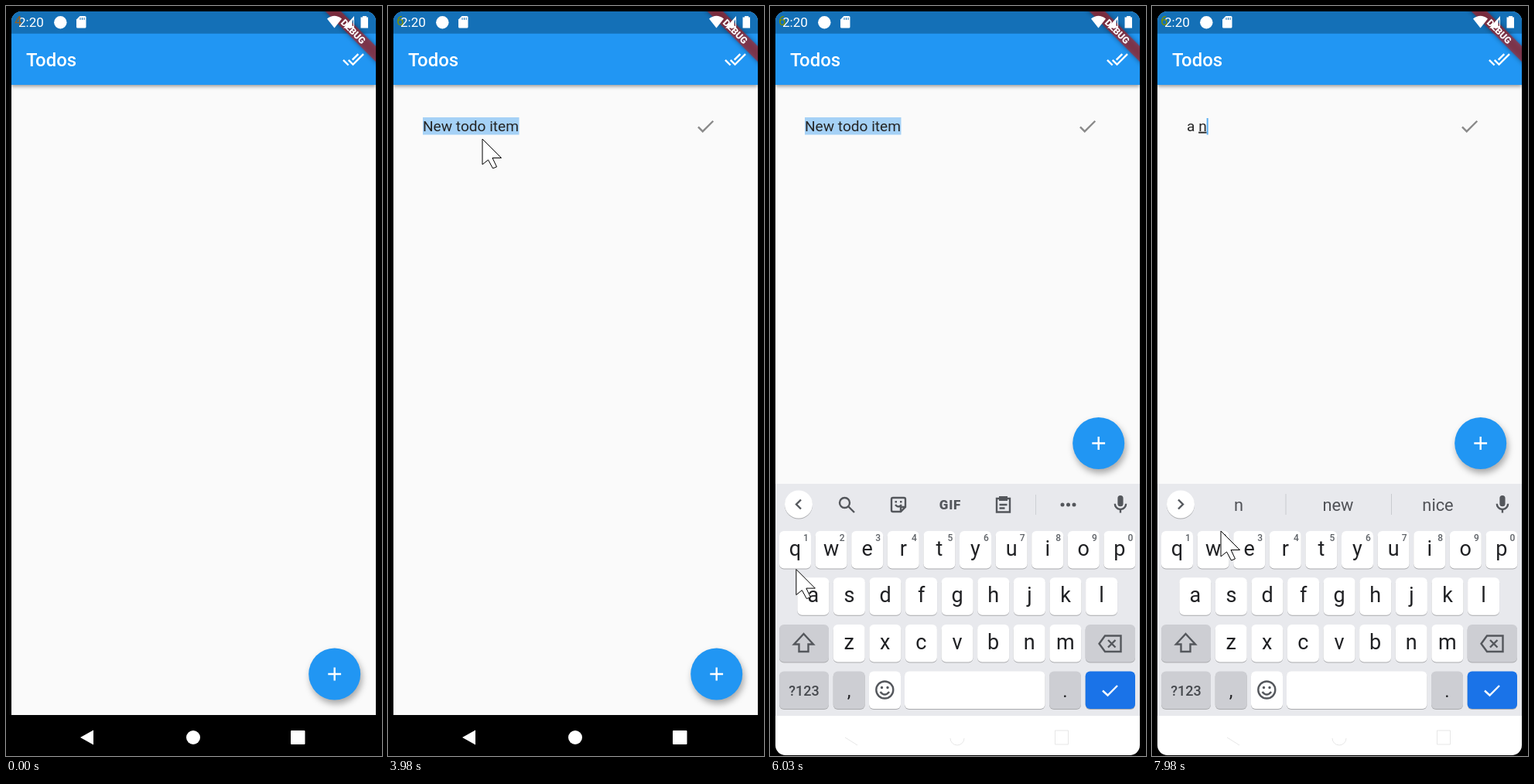
Animation of 486 by 970 pixels, one loop 8 s. Source, as an HTML page:

```html
<!DOCTYPE html>
<html lang="en">
<head>
<meta charset="utf-8">
<title>Todos</title>
<style>
  html, body { margin: 0; width: 100%; height: 100%; overflow: hidden; background: #000; }
  svg { display: block; width: 486px; height: 970px; font-family: Roboto, sans-serif; }
  text { white-space: pre; }
  .mid { text-anchor: middle; }
  .line { fill: none; stroke: #54575c; stroke-width: 2.4; }
  .key { filter: drop-shadow(0 1px .6px #0004); }
  #composing { text-decoration: underline; }
</style>
</head>
<body>
<svg viewBox="0 0 486 970">
  <defs>
    <clipPath id="screen"><rect x="7" y="7" width="471" height="962" rx="13"/></clipPath>
    <clipPath id="aboveNav"><rect x="7" y="102" width="471" height="816"/></clipPath>
  </defs>
  <rect width="486" height="970"/>
  <g clip-path="url(#screen)">
    <rect x="7" y="7" width="471" height="910" fill="#fafafa"/>
    <rect x="7" y="7" width="471" height="95" fill="#2196f3" style="filter:drop-shadow(0 2px 2.5px #0006)"/>
    <rect x="7" y="7" width="471" height="28.7" fill="#1470b7"/>
    <text x="26" y="78" font-size="23.9" font-weight="500" fill="#fff">Todos</text>
    <path transform="translate(434.6 54.6) scale(1.196)" fill="#fff" d="M18 7l-1.41-1.41-6.34 6.34 1.41 1.41zm4.24-1.41L11.66 16.17 7.48 12l-1.41 1.41L11.66 19l12-12zM.41 13.41L6 19l1.41-1.41L1.83 12z"/>
    <g transform="translate(449 33) rotate(45)">
      <rect x="-70" y="-7.2" width="140" height="14.4" fill="#b71c1c" fill-opacity=".63" style="filter:drop-shadow(0 0 3px #0009)"/>
      <text class="mid" y="4.4" font-size="12.2" font-weight="900" fill="#fff">DEBUG</text>
    </g>

    <g fill="#fff">
      <text x="16" y="27.3" font-size="17">2:20</text>
      <circle cx="70.3" cy="21.2" r="8.2"/>
      <path d="M95.500 13H102q1.500 0 1.500 1.500V27q0 1.500-1.500 1.500H92.500q-1.500 0-1.500-1.500V17.500z"/>
      <path d="M415 16.500Q424.500 9 434 16.500L424.500 28.500z"/>
      <path d="M450 13V28.500H436zM447.500 20V26H449V17z" fill-rule="evenodd"/>
      <path d="M461 13h5v1.500h2V28.500h-9.500V14.500h2.500z"/>
    </g>
    <path d="M96 15v3M98.500 15v3M101 15v3" stroke="#1470b7"/>
    <text id="counter" x="11" y="25" font-size="17"/>

    <g id="item">
      <rect id="selection" x="45" y="144" width="124.500" height="22.500" fill="#a5d1f6"/>
      <text id="label" x="45" y="161.7" font-size="19.1" fill="#252525"><tspan id="settled"></tspan><tspan id="composing"></tspan></text>
      <rect id="caret" y="145" width="2" height="21.500" fill="#5aaef2"/>
      <path transform="translate(396 141.2) scale(1.196)" fill="#8a8a8a" d="M9 16.170L4.830 12l-1.420 1.410L9 19 21 7l-1.410-1.410z"/>
    </g>

    <g id="fab">
      <circle cx="424.700" cy="864" r="33.500" fill="#2196f3" style="filter:drop-shadow(2px 5px 4px #0005)"/>
      <path d="M416.300 864h16.800M424.700 855.600v16.800" stroke="#fff" stroke-width="2.400"/>
    </g>

    <g fill="#fff">
      <rect x="7" y="917" width="471" height="53" fill="#000"/>
      <path d="M96 946l17-9.500v19z"/>
      <circle cx="242" cy="946" r="9"/>
      <rect x="368" y="937" width="18.500" height="18" rx="1"/>
    </g>
    <g id="lightNav">
      <path d="M7 917.500H478V970H7z" fill="#fff"/>
      <path d="M7 917.500H478" stroke="#d9dadc"/>
      <path d="M97 946l16 10M233 947a9 9 0 0 0 18 0M368.500 937h17v18h-17z" fill="none" stroke="#e6e6e6"/>
    </g>

    <g clip-path="url(#aboveNav)"><g id="keyboard">
      <rect x="7" y="618" width="471" height="300" fill="#e8e9ed"/>
      <circle class="key" cx="37" cy="644.500" r="18" fill="#fff"/>
      <path id="chevron" class="line"/>
      <path transform="translate(438.600 630.500) scale(1.196)" fill="#54575c" d="M12 14a3 3 0 0 0 3-3V5a3 3 0 0 0-6 0v6a3 3 0 0 0 3 3zm5-3a5 5 0 0 1-10 0H5a7 7 0 0 0 6 6.920V21h2v-3.080A7 7 0 0 0 19 11z"/>
      <g id="tools">
        <circle class="line" cx="96.500" cy="642.500" r="6.500"/>
        <path class="line" d="M101 647l8 8M159 636q-2 0-2 2v14q0 2 2 2h10l6-6v-10q0-2-2-2zM169 654v-6h6M162 645q4 5 8 0M293 637v17.500h17V637zM296.500 645h10M296.500 649.500h7" stroke-width="2"/>
        <path d="M161.500 640h2.500v2.500h-2.500zM168 640h2.500v2.500H168zM296 634h11v6h-11z" fill="#54575c"/>
        <text class="mid" x="233" y="650.500" font-size="17" font-weight="900" fill="#54575c" letter-spacing=".8">GIF</text>
        <path d="M343.500 632v26" stroke="#ced0d4"/>
        <path d="M378 645h.01M385.500 645h.01M393 645h.01" stroke="#54575c" stroke-width="5" stroke-linecap="round"/>
      </g>
      <g id="suggestions" class="mid" font-size="21.800" fill="#505257">
        <path d="M173 631v27M309.500 631v27" stroke="#c9cbcf"/>
        <text x="112" y="653"/><text x="240.500" y="653"/><text x="369.500" y="653"/>
      </g>
      <g id="keys"></g>
      <path class="line" d="M43.500 812L31 825.500h6.500V835h12v-9.500H56z"/>
      <path class="line" d="M433 814.500h20.500v20.500H433l-7.500-10.250zM437 820l9.500 9.500M446.500 820l-9.500 9.500"/>
      <circle class="line" cx="148.300" cy="884.500" r="11"/>
      <path class="line" d="M142.500 887q5.800 7 11.600 0" stroke-width="2"/>
      <path d="M144.500 881.500h.01M152 881.500h.01" stroke="#54575c" stroke-width="3.400" stroke-linecap="round"/>
      <path d="M430 885.500l6.500 6 12.500-12.500" fill="none" stroke="#fff" stroke-width="2.400"/>
    </g></g>
  </g>
  <path id="pointer" d="M0 0V33L7.500 27 13.500 38 18.500 36 13 24.500H24.500z" fill="#fff" stroke="#000"/>
  <circle id="press" r="24" fill="#fffa00" fill-opacity=".5"/>
</svg>
<script>
const LOOP = 8000;
const $ = id => document.getElementById(id);
const show = (id, on) => { $(id).style.display = on ? '' : 'none'; };
const clamp = v => Math.min(1, Math.max(0, v));

// Keyboard
const PITCH = 46.6;
const key = (x, y, width, fill) =>
  `<rect class="key" x="${x}" y="${y}" width="${width}" height="48.500" rx="6" fill="${fill}"/>`;
const caption = (x, y, size, text, fill = '#202124', weight = 400) =>
  `<text class="mid" x="${x}" y="${y}" font-size="${size}" fill="${fill}" font-weight="${weight}">${text}</text>`;
const letters = (row, left, top) => [...row].map((letter, i) => {
  const x = left + i * PITCH;
  return key(x, top, 41, '#fff') + caption(x + 20.5, top + 31.7, 27, letter);
}).join('');
const digits = [...'1234567890'].map((digit, i) =>
  caption(46.5 + i * PITCH, 692, 12, digit, '#5f6368', 500)).join('');
const GREY = '#cdced3';
$('keys').innerHTML =
  letters('qwertyuiop', 12, 679) + digits +
  letters('asdfghjkl', 35.3, 739.3) +
  letters('zxcvbnm', 81.7, 800) +
  key(12, 800, 64, GREY) + key(407.7, 800, 64.3, GREY) +
  key(12, 860.5, 64, GREY) + key(81.7, 860.5, 41, GREY) +
  key(128, 860.5, 41, '#fff') + key(174, 860.5, 181.5, '#fff') +
  key(361, 860.5, 41, GREY) + key(407.7, 860.5, 64.3, '#1a73e8') +
  caption(44, 891.5, 18, '?123', '#46494e', 500) +
  caption(102, 894, 24, ',') + caption(381.5, 894, 24, '.');

// Pointer waypoints: time, x, y
const route = [
  [470, 445, 975], [1040, 425, 867], [1700, 425, 867], [2020, 456, 500],
  [2350, 190, 65], [2430, 190, 65], [2560, 162, 110], [2760, 122, 177],
  [3300, 122, 177], [3610, 122, 172], [4060, 122, 172], [4290, 176, 231],
  [5420, 176, 231], [5490, 190, 224], [5740, 336, 440], [6040, 28, 735],
  [6200, 57, 759], [6650, 57, 759], [7040, 230, 884], [7260, 230, 884],
  [7470, 334, 824], [7680, 334, 824], [7910, 159, 737], [7980, 89, 679]
];
const presses = [[1550, 1700], [2920, 3080], [3780, 3940], [6240, 6410], [7100, 7220], [7500, 7630]];

// Values that switch at fixed times
const counters = [[0, '4', '#96601f'], [1800, 'ı', '#8a8420'], [3000, '6', '#7d9000'], [6240, '5', '#7d9000'], [7100, '6', '#7d9000']];
const typed = [
  [0, 'New todo item', '', []],
  [6570, '', 'a', ['a', 'and', 'at']],
  [7210, 'a ', '', ['few', 'lot', 'good']],
  [7630, 'a ', 'n', ['n', 'new', 'nice']]
];
const current = (list, t) => list.filter(entry => entry[0] <= t).pop();

function slope(i, axis) {
  const before = route[i - 1], here = route[i], after = route[i + 1];
  const still = p => p[1] === here[1] && p[2] === here[2];
  if (!before || !after || still(before) || still(after)) return 0;
  return (after[axis] - before[axis]) / (after[0] - before[0]);
}

function pointerAt(t) {
  if (t <= route[0][0]) return route[0].slice(1);
  const i = route.findIndex(p => p[0] > t) - 1;
  if (i < 0) return route[route.length - 1].slice(1);
  const a = route[i], b = route[i + 1], span = b[0] - a[0], u = (t - a[0]) / span;
  return [1, 2].map(axis =>
    a[axis] + (b[axis] - a[axis]) * u * u * (3 - 2 * u) +
    span * u * (1 - u) * (slope(i, axis) * (1 - u) - slope(i + 1, axis) * u));
}

function draw(t) {
  const [x, y] = pointerAt(t);
  const place = `translate(${x} ${y})`;
  $('pointer').setAttribute('transform', place);
  $('press').setAttribute('transform', place);
  show('press', presses.some(([from, to]) => t >= from && t < to));

  const [, digit, tint] = current(counters, t);
  $('counter').textContent = digit;
  $('counter').setAttribute('fill', tint);

  const [, settled, composing, words] = current(typed, t);
  const editing = words.length > 0;
  show('item', t >= 1850);
  show('selection', t >= 3080 && !editing);
  $('settled').textContent = settled;
  $('composing').textContent = composing;
  show('caret', editing);
  if (editing) $('caret').setAttribute('x', 45 + $('label').getComputedTextLength());

  const rise = 1 - (1 - clamp((t - 4060) / 230)) ** 2;
  show('keyboard', rise > 0);
  show('lightNav', rise > 0);
  $('keyboard').setAttribute('transform', `translate(0 ${300 * (1 - rise)})`);
  $('fab').setAttribute('transform', `translate(0 ${-298.5 * rise})`);

  show('tools', !editing);
  show('suggestions', editing);
  $('chevron').setAttribute('d', editing ? 'M34 638.500l6 6-6 6' : 'M40 638.500l-6 6 6 6');
  $('suggestions').querySelectorAll('text').forEach((node, i) => { node.textContent = words[i] || ''; });
}

const start = performance.now();
function tick() {
  draw((performance.now() - start) % LOOP);
  requestAnimationFrame(tick);
}
tick();
</script>
</body>
</html>
```
